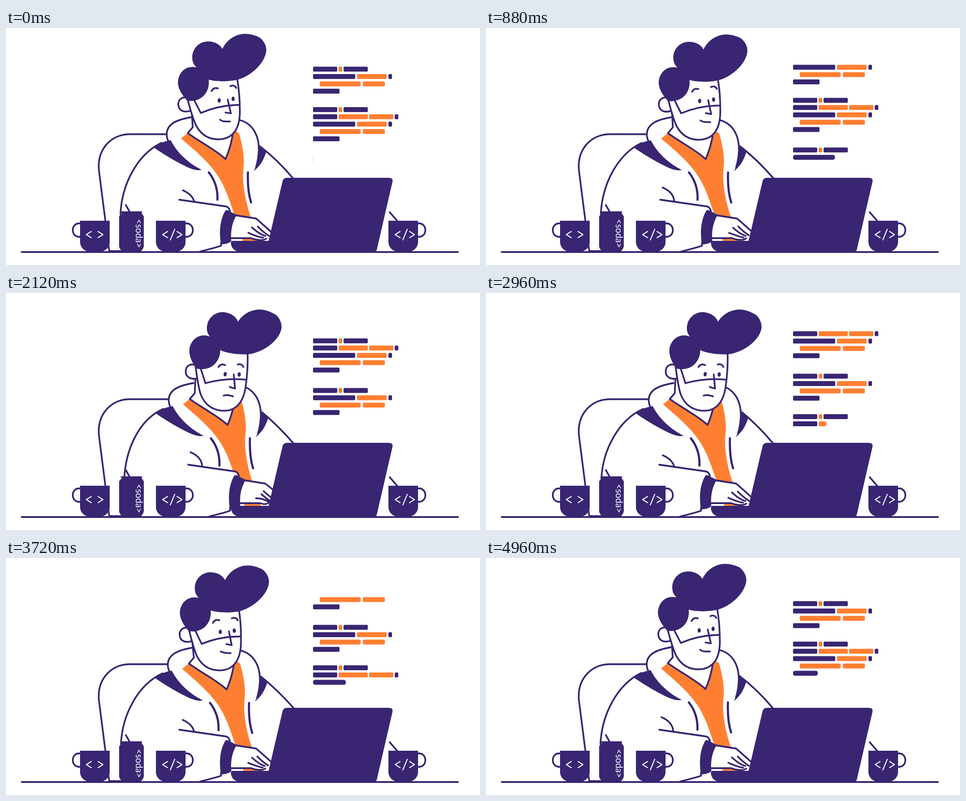
These frames come from a looping animation (1056x530 px, 5 s). An HTML page:

```html
<!DOCTYPE html>
<html lang="en">
<head>
<meta charset="utf-8">
<title>Coding at the desk</title>
<style>
  html, body { margin: 0; width: 100%; height: 100%; overflow: hidden; background: #fff; }
  svg { display: block; width: 100vw; height: 100vh; }
  .line { fill: none; stroke: #392572; stroke-width: 3.8; stroke-linecap: round; stroke-linejoin: round; }
  .thick { stroke-width: 4.8; }
  .skin { fill: #fff; }
  .navy { fill: #392572; }
  .orange { fill: #ff7f32; }
  .glyph { fill: none; stroke: #fff; stroke-width: 2.1; stroke-linecap: round; stroke-linejoin: round; }
  text { font: 20.2px Lato, "Open Sans", sans-serif; fill: #fff; }
</style>
</head>
<body>
<svg viewBox="0 0 1056 530">
  <defs>
    <g id="cup">
      <path class="line" d="M0 437 H2 C21 437 21 467 2 467 H0" transform="translate(66)"/>
      <path class="navy" d="M0 431 H66 V478 C66 491 56 500 44 500 H22 C10 500 0 491 0 478Z"/>
    </g>
    <path id="tag" class="glyph" d="M26 455 L15 462 L26 469 M42 450 L32 474 M47 455 L58 462 L47 469"/>
  </defs>

  <path class="line" d="M362 237.500 H278 C231 237 203 274 207 318 L230 499 H262"/>
  <path class="line" id="farArm"/>
  <path class="line" id="back"/>

  <g id="body">
    <path class="skin" d="M415 199 C384 204 358 213 358 238 C359 266 398 304 436 317 L510 420 L547 420 L553 319 C570 285 564 217 521 206Z"/>
    <path class="navy" d="M329 267 C341 258 353 253 367 251 C381 279 408 304 436 317 C424 321 406 313 384 301 C362 289 345 278 329 267Z"/>
    <path class="navy" d="M563 262 L580 276 C574 296 566 309 552 320 C561 303 564 283 563 262Z"/>
    <path class="orange" d="M390 247 L406 234 L489 293 L508 231 Q514 231 519 235 C526 258 530 282 530 300 C529 317 527 330 529 350 C532 376 537 398 545 422 L565 478 H528 L510 420 C501 397 494 371 482 348 C463 309 427 279 390 247Z"/>
    <path class="line" d="M415 199 C384 204 358 213 358 238 C358 254 372 272 388 288 C396 296 405 304 416 310"/>
    <path class="line" d="M521 206 C551 214 565 243 563 277 C562 291 560 302 557 311"/>
    <path class="line thick" d="M452 323 C466 341 472 361 471 384 M539 323 C538 349 540 371 546 390"/>
    <path class="skin" d="M414 190 L416 222 L405 235 L489 293 L507 235 L500 200Z"/>
    <path class="line" d="M416 222 L405 235 C432 255 468 273 489 293 C497 275 502 257 505 238"/>
  </g>
  <path class="line" id="neck"/>

  <g id="head">
    <path class="line" id="ear" style="fill:#fff" d="M407 157 C392 151 383 161 384 172 C385 185 397 190 411 185"/>
    <path class="line" id="jaw" style="fill:#fff" d="M404 158 C410 178 415 201 424 219 C435 239 452 249 473 249 C504 249 521 227 521 187 C521 160 519 136 515 113"/>
    <path class="navy" d="M482 47 C492 25 513 13 533 13 C545 13 556 17 563 20 C573 26 580 38 580 49 C579 76 548 106 518 115 C500 120 468 121 450 115 L440 97 C423 91 414 80 415 64 C416 44 432 30 450 30 C466 30 478 38 482 47Z"/>
    <path class="navy" d="M452 121 C452 146 434 166 404 163 C395 153 383 138 383 121 C384 101 398 87 415 87 C437 87 452 103 452 121Z"/>
    <g id="face">
      <path class="line" id="beard"/>
      <ellipse class="navy" cx="475" cy="162" rx="3.6" ry="5"/>
      <ellipse class="navy" cx="506" cy="158.500" rx="3.6" ry="5"/>
      <path class="line" d="M494 160 L501 191 L489 189"/>
      <path class="line" id="brows" d="M458 141 C461 135 466 133 472 135 M500 130 C505 127 511 129 513 134"/>
      <path class="line" id="mouth"/>
    </g>
  </g>

  <g id="arm">
    <path class="skin" d="M386 384 L492 399 L501 410 L510 420 L501 482 L478 487 L433 500Z"/>
    <path class="line" d="M386 384 L490 399 Q496 400 499 409"/>
    <path class="line" d="M432 500 C446 496 462 493 479 487 V480"/>
    <path class="line" id="crease"/>
    <path class="skin" id="palm"/>
    <path class="line" id="fingers"/>
    <path class="navy" d="M489 408 Q493 406 497 409 L514 418 C503 436 500 456 502 477 Q493 484 479 484 C474 456 477 427 489 408Z"/>
  </g>

  <path class="navy" d="M626 335 H852 Q863 335 861 344 L826 496 Q825 500 820 500 H521 C508 500 501 490 501 480 Q501 476 506 476 H585 L616 343 Q618 335 626 335Z"/>

  <path class="line" d="M267 396 L276 412 M855 412 L872 432"/>
  <path class="navy" d="M258 411 H302 V414 L307 421 V488 Q307 492 301 499 H258 Q252 492 252 488 V421 L258 414Z"/>
  <path class="line" style="stroke-width:3" d="M257 411.500 H302"/>
  <text transform="translate(288.500 427) rotate(90)">&lt;soda&gt;</text>
  <use href="#cup" transform="translate(231) scale(-1 1)"/>
  <path class="glyph" d="M190 455 L179 462 L190 469 M205 455 L216 462 L205 469"/>
  <use href="#cup" x="334"/><use href="#tag" x="334"/>
  <use href="#cup" x="852"/><use href="#tag" x="852"/>
  <path class="line" d="M35 501 H1007"/>

  <g id="code"></g>
</svg>
<script>
const LOOP = 5000, RATE = 0.255, PERIOD = 201.5, SCROLL_MS = 40;
const $ = id => document.getElementById(id);
const set = (id, name, value) => $(id).setAttribute(name, value);
const mix = (a, b, u) => a + (b - a) * u;
const clamp = u => Math.min(1, Math.max(0, u));
const ease = (t, from, to) => { const u = clamp((t - from) / (to - from)); return u * u * (3 - 2 * u); };

// Mixes the numbers of two paths that share their commands.
const morph = (u, a, b) => {
  const to = b.match(/-?[\d.]+/g);
  let i = 0;
  return a.replace(/-?[\d.]+/g, n => mix(+n, +to[i++], u).toFixed(2));
};

function track(t, keys) {
  for (let i = 1; i < keys.length; i++) {
    const [t0, v0] = keys[i - 1], [t1, v1] = keys[i];
    if (t <= t1) return mix(v0, v1, ease(t, t0, t1));
  }
  return keys[keys.length - 1][1];
}

// Segments of a code line: x, width, colour.
const N = "navy", O = "orange";
const HEAD = [[684, 54, N], [741, 8, O], [752, 54, N]];
const CALL = [[684, 94, N], [782, 66, O], [852, 8, N]];
const ARGS = [[699, 91, O], [795, 49, O]];
const END = [[684, 59, N]];
const LONG = [[684, 54, N], [741, 65, O], [809, 54, O], [866, 8, N]];

// Each line: segments, place in the listing, time its typing starts.
const LINES = [
  [HEAD, 0, 0], [CALL, 16.4, 515], [ARGS, 32.9, 1274], [END, 49.2, 1875],
  [HEAD, 90.5, 2165], [LONG, 106.5, 2668], [CALL, 123, 3434], [ARGS, 139.4, 4165], [END, 155.7, 4745]
];

const pool = Array.from({ length: 60 }, () => {
  const r = document.createElementNS("http://www.w3.org/2000/svg", "rect");
  r.setAttribute("height", 11);
  $("code").append(r);
  return r;
});

// The listing jumps up shortly before each new line begins.
function scrollAt(t) {
  const perMs = PERIOD / LOOP;
  const stops = [...LINES.map(l => l[2]), LOOP];
  let y = 0;
  for (let i = 1; i < stops.length; i++)
    y += (stops[i] - stops[i - 1]) * perMs * clamp((t - stops[i] + SCROLL_MS) / SCROLL_MS);
  return y;
}

function drawCode(t) {
  const shift = 293.5 - scrollAt(t);
  let used = 0;
  for (let page = -2; page <= 0; page++) {
    for (const [segs, place, start] of LINES) {
      const y = place + page * PERIOD + shift;
      if (y < 86.5) continue;
      const typed = page < 0 ? 999 : (t - start) * RATE;
      const edge = segs[0][0] + typed;
      for (const [x, full, colour] of segs) {
        const w = Math.min(full, edge - x);
        if (w <= 0) continue;
        const r = pool[used++];
        r.setAttribute("class", colour);
        r.setAttribute("x", x);
        r.setAttribute("y", (y - 5.5).toFixed(2));
        r.setAttribute("width", w.toFixed(2));
        r.setAttribute("rx", w < full ? 4.5 : 2.5);
      }
    }
  }
  pool.forEach((r, i) => r.style.display = i < used ? "" : "none");
}

function drawPerson(t) {
  const down = ease(t, 760, 1520);
  const p = down - ease(t, 3130, 3930);
  const b = down - ease(t, 3300, 4200);
  const reach = track(t, [[0, 0], [400, 7], [660, 0], [820, 0], [1120, 20], [2720, 20], [2940, 0], [5000, 0]]);
  const bend = track(t, [[0, 0], [400, 0.6], [1100, 1], [2720, 1], [2920, 0], [3720, 0.15], [4920, 1], [5000, 1]]);
  const tap = 0.5 - 0.5 * Math.cos(t * Math.PI / 250);
  const grip = clamp(reach / 20 + tap * 0.15);

  set("head", "transform", `translate(${p} ${p}) rotate(${7.7 * p} 378 306)`);
  set("ear", "transform", `translate(${-2.5 * p} 0)`);
  set("jaw", "transform", `translate(${-2.5 * p} 0)`);
  set("face", "transform", `translate(${-5.5 * p} ${5 * p})`);
  set("beard", "d", morph(p, "M419 161 L434 190 C462 178 489 172 520 172", "M419 156 L434 188 C462 176 491 169 523 168"));
  set("brows", "transform", `translate(0 ${7 * p})`);
  set("mouth", "d", morph(p, "M477 205 C482 210 489 209 499 209", "M478 210 C484 207 491 207 499 209"));

  set("body", "transform", `translate(${4.5 * b} ${2 * b})`);
  set("neck", "d", `M${414 + 8 * p} 190 L${416 + 4.5 * b} ${222 + 2 * b}`);
  const hip = 255 + 2 * b + 0.32 * reach;
  set("back", "d", `M${346 + 4.5 * b} ${257 + 2 * b} C${292 + 4 * b} 283 ${hip + 3} 350 ${hip} 416`);
  set("farArm", "d", `M${565 + 4.5 * b} ${264 + 2 * b} C594 286 617 309 ${641 + 2 * tap} 338`);

  set("arm", "transform", `translate(${reach} 0)`);
  set("crease", "d", morph(bend, "M394 363 C408 369 416 378 419 387", "M391 356 C405 362 416 372 417 387"));
  set("palm", "d", morph(grip,
    "M512 419 L556 426 L592 458 L580 474 L546 470 H501 C501 455 505 435 512 419Z",
    "M512 419 L557 426 L592 452 L580 474 L546 470 H501 C501 455 505 435 512 419Z"));
  set("fingers", "d", morph(grip,
    "M512 419 L557 426 Q572 439 594 459 M501 470 H546 C558 475 573 476 580 471 M540 458 C552 463 562 468 573 469 M548 446 C559 456 568 463 578 465 M561 444 Q571 455 586 465",
    "M512 419 L557 426 Q566 432 580 445 M501 470 H546 C552 472 559 474 565 469 M537 459 C548 459 557 462 566 467 M549 450 C556 456 561 460 568 465 M554 443 Q560 449 569 456"));
}

const begin = performance.now();
function frame() {
  const t = (performance.now() - begin) % LOOP;
  drawPerson(t);
  drawCode(t);
  requestAnimationFrame(frame);
}
frame();
</script>
</body>
</html>
```
